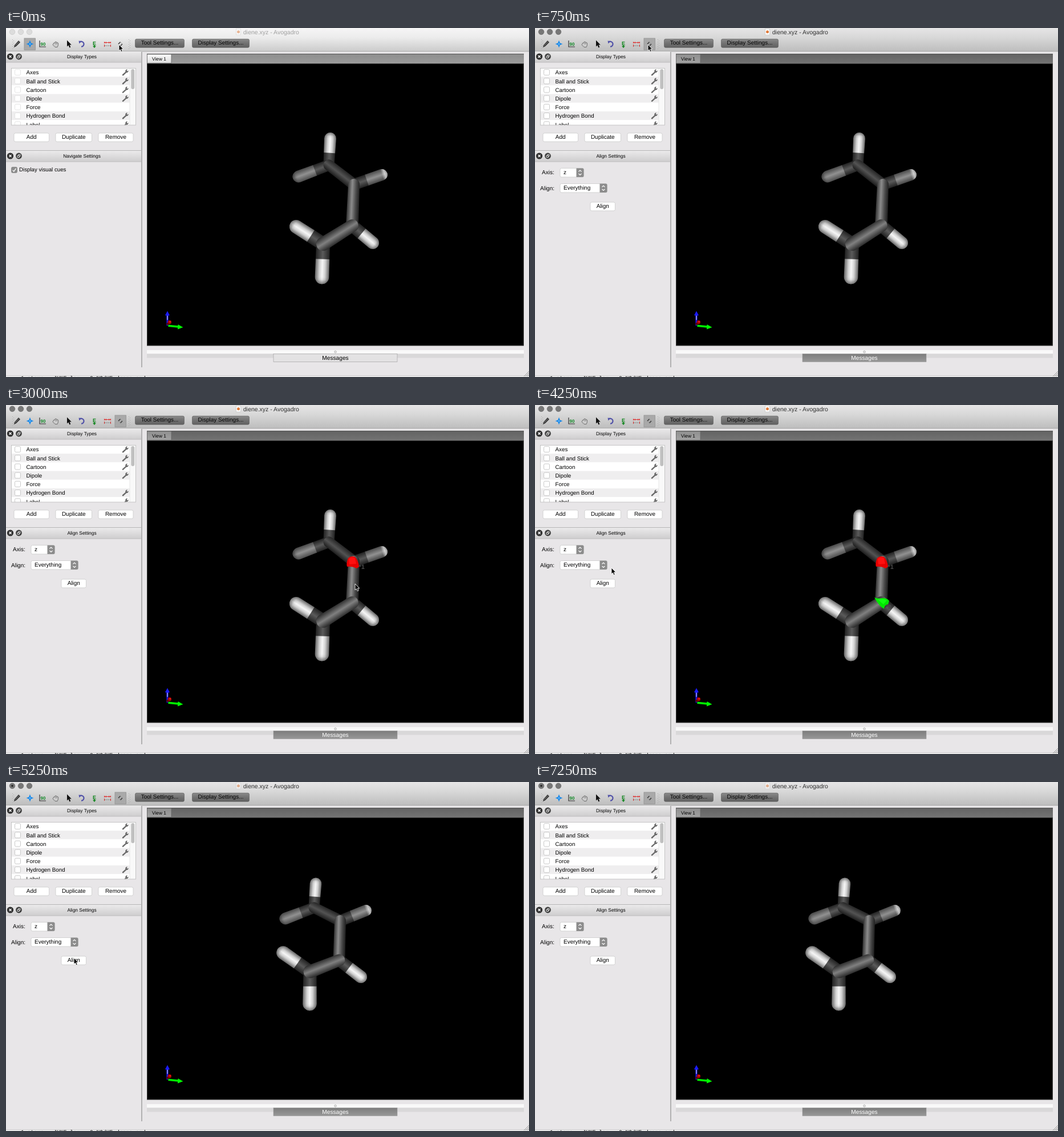
An HTML page for the animation above (7750 ms loop, 917 by 611 pixels).

```html
<!DOCTYPE html>
<html lang="en">
<head>
<meta charset="utf-8">
<title>Aligning a molecule</title>
<style>
html, body { margin: 0; width: 100%; height: 100%; overflow: hidden; background: #e8e6e8; }
svg { display: block; width: 917px; height: 611px; }
text { font-family: "Liberation Sans", Arial, sans-serif; font-size: 10px; text-rendering: geometricPrecision; }
.mid { text-anchor: middle; }
.small { font-size: 8.4px; }
</style>
</head>
<body>
<svg id="stage" viewBox="0 0 917 611"></svg>
<script>
const TICK = 250, LOOP = 7750;

// ---------- helpers ----------
const rect = (x, y, w, h, fill, more = '') =>
  `<rect x="${x}" y="${y}" width="${w}" height="${h}" fill="${fill}" ${more}/>`;
const text = (x, y, s, more = '') => `<text x="${x}" y="${y}" ${more}>${s}</text>`;
const circle = (x, y, r, fill, more = '') =>
  `<circle cx="${x}" cy="${y}" r="${r}" fill="${fill}" ${more}/>`;
const path = (d, fill, more = '') => `<path d="${d}" fill="${fill}" ${more}/>`;
const line = (d, color, w = 1, more = '') =>
  path(d, 'none', `stroke="${color}" stroke-width="${w}" ${more}`);
const group = (id, body) => `<g id="${id}">${body}</g>`;
const at = (x, y, body) => `<g transform="translate(${x} ${y})">${body}</g>`;
const stops = list => list.map(([o, c, a = 1]) =>
  `<stop offset="${o}" stop-color="${c}" stop-opacity="${a}"/>`).join('');
const vertical = (id, ...list) =>
  `<linearGradient id="${id}" x2="0" y2="1">${stops(list)}</linearGradient>`;
const horizontal = (id, ...list) => `<linearGradient id="${id}">${stops(list)}</linearGradient>`;

const defs = `<defs>
  ${vertical('barOff', [0, '#f6f5f6'], [.4, '#ececec'], [1, '#cbcbcb'])}
  ${vertical('barOn', [0, '#e6e5e6'], [.4, '#d8d8d8'], [1, '#bdbdbd'])}
  ${vertical('dock', [0, '#ebeaeb'], [1, '#cfcecf'])}
  ${vertical('pill', [0, '#8a8a8a'], [.5, '#727272'], [1, '#606060'])}
  ${vertical('tabOff', [0, '#fafafa'], [1, '#dcdcdc'])}
  ${vertical('tabOn', [0, '#8f8f8f'], [1, '#a2a2a2'])}
  ${vertical('stripOff', [0, '#8d8d8d'], [1, '#9c9c9c'])}
  ${vertical('stripOn', [0, '#626262'], [1, '#747474'])}
  ${vertical('message', [0, '#7c7c7c'], [1, '#989898'])}
  ${vertical('carbonDark', [0, '#242424'], [.5, '#535353'], [1, '#1c1c1c'])}
  ${vertical('carbonSide', [0, '#1c1c1c'], [.3, '#4a4a4a'], [.62, '#8c8c8c'], [1, '#303030'])}
  ${vertical('carbonLit', [0, '#2a2a2a'], [.5, '#808080'], [1, '#2c2c2c'])}
  ${vertical('stub', [0, '#222'], [.5, '#5a5a5a'], [1, '#222'])}
  ${vertical('bright', [0, '#666'], [.3, '#d2d2d2'], [.5, '#f6f6f6'], [.7, '#d2d2d2'], [1, '#666'])}
  ${vertical('dim', [0, '#4c4c4c'], [.5, '#919191'], [1, '#464646'])}
  ${horizontal('shadeTip', [0, '#000', 0], [.35, '#000', .06], [1, '#000', .5])}
  ${horizontal('litTip', [0, '#fff', 0], [.55, '#fff', .6], [1, '#ccc', .3])}
  <clipPath id="listClip">${rect(9, 70, 219, 100, '#fff')}</clipPath>
  <path id="wrench" d="M-5 4.2L.6 -.8Q-.2 -4.4 3 -5.2L3.6 -4.8 2.4 -3 3.8 -1.6 5.6 -2.8Q5.4 .6 2 .5L-3.4 5.6Q-5.4 6-5 4.2Z" fill="#666" stroke="#444" stroke-width=".3"/>
</defs>`;

// ---------- window chrome ----------
function toolbar() {
  const dots = x => Array.from({ length: 9 }, (_, i) => rect(x + i % 2 * 2, 20 + i * 2, 1, 1, '#aaa')).join('');
  const pressed = (id, x) => group(id, rect(x, 18, 19.5, 20.5, '#a9a9a9', 'stroke="#929292" stroke-width=".8"'));
  const pill = (x, w, s) => rect(x + .5, 19.3, w - 1, 15, 'url(#pill)', 'rx="2.5" stroke="#595959" stroke-width=".6"') +
    text(x + w / 2, 29.3, s, 'class="mid"');
  return pressed('navPressed', 32) + pressed('alignPressed', 191) +
    dots(11) + dots(215) +
    at(19, 28, path('M-5 6L-4 2 3-6 6-3-1 4Z', '#333') + line('M-3 3L4-4', '#888', 1)) +
    at(42, 28, path('M0-6.5L1.8-1.8 6.5 0 1.8 1.8 0 6.5-1.8 1.8-6.5 0-1.8-1.8Z', '#1687e8') + circle(0, 0, 1.2, '#7cc4ff')) +
    at(64, 28, line('M-5-6V5H6', '#333', 1.2) + text(-3.5, 3, '90', 'fill="#168a2b" style="font-size:8px;font-weight:bold"')) +
    at(87, 28.5, path('M-4-1Q-4-3-2-2L-1-4Q0-5 1-4L3-3Q5-3 4.6 0L4 3 3 5H-1L-5 1Z', '#ccc', 'stroke="#555" stroke-width=".8"') + line('M0-3V0M2-3V0', '#666', .7)) +
    at(107, 21.5, path('M0 0V11L2.5 8.8 4.4 13 6.3 12 4.5 8H7.8Z', '#111')) +
    at(133, 28, line('M-3.5-3.5A4.5 4.5 0 1 1-1 4.7', '#5051a8', 2.2) + path('M-5.5-5.5L-1-5-4.5-.5Z', '#5051a8')) +
    at(155, 28, text(0, 1.5, 'E', 'class="mid" fill="#11861e" style="font-size:9px;font-weight:bold"') +
      line('M0 2V5', '#11861e', 1.5) + path('M-3 3.5H3L0 7Z', '#11861e')) +
    at(178, 28, line('M-5.5-4V-1M5.5-4V-1M-5-2.5H5M-5.5 1V5M5.5 1V5', '#d33', 1) +
      line('M-5 3H5', '#777', 1.2, 'stroke-dasharray="2 1"') + path('M-5-2.5L-2-4V-1ZM5-2.5L2-4V-1Z', '#d33')) +
    at(200.5, 28, line('M-3.5 0L0-3.5M0 3.5L3.5 0', '#333', 1.4) + line('M-3.5 0L0 3.5M0-3.5L3.5 0', '#888', .6)) +
    pill(226, 87, 'Tool Settings...') + pill(326, 101, 'Display Settings...');
}

function dockTitle(y, id, label) {
  const cy = y + 9;
  return rect(0, y, 237, 18.5, 'url(#dock)') + line(`M0 ${y - .5}H237M0 ${y + 19}H237`, '#aaa', .8) +
    circle(7.5, cy, 5.6, '#303030') + line(`M5.5 ${cy - 2}l4 4m0-4l-4 4`, '#fff', 1.4) +
    circle(22.5, cy, 5.4, '#404040') +
    line(`M20 ${cy - .5}h3.5v3h-3.5zM21.5 ${cy - .5}v-2h3.5v3h-1.5`, '#fff', .8) +
    text(133, cy + 3, label, `class="mid small" id="${id}"`);
}

const button = (x, y, w, s) =>
  rect(x, y, w, 15, '#fff', 'rx="2.5" stroke="#c4c4c4" stroke-width=".7"') +
  text(x + w / 2, y + 10, s, 'class="mid"');

const combo = (y, w, s) =>
  rect(44, y, w, 15.5, '#fff', 'rx="2.5" stroke="#c4c4c4" stroke-width=".7"') +
  path(`M${31 + w} ${y}h10.5q2.5 0 2.5 2.5v10.5q0 2.5-2.5 2.5h-10.5z`, '#8c8c8c') +
  line(`M${35 + w} ${y + 6}l2.5-2.5 2.5 2.5m-5 3.5l2.5 2.5 2.5-2.5`, '#fff', 1.1) +
  text(50, y + 10.5, s);

function displayList() {
  const names = ['Axes', 'Ball and Stick', 'Cartoon', 'Dipole', 'Force', 'Hydrogen Bond', 'Label'];
  const rows = names.map((name, i) => {
    const y = 70 + i * 15.2;
    return rect(9, y, 208, 15.2, i % 2 ? '#efeeef' : '#fff') +
      rect(15.5, y + 2.6, 10, 10, '#fff', 'class="box" rx="2" stroke-width=".8"') +
      text(35.5, y + 11.4, name, 'style="font-size:9.8px"') +
      (name === 'Force' ? '' : `<use href="#wrench" x="209" y="${y + 7.6}"/>`);
  }).join('');
  return `<g clip-path="url(#listClip)">${rect(9, 70, 219, 100, '#fff')}${rows}
    ${rect(217, 70, 11, 100, '#f9f9f9')}${line('M217 70V170', '#e2e2e2', .8)}
    ${rect(219.3, 72, 6, 35, '#c0c0c0', 'rx="3"')}</g>` +
    rect(9.5, 70.5, 218, 99.5, 'none', 'stroke="#b9b9b9" stroke-width=".8"') +
    button(14, 184, 61.5, 'Add') + button(87, 184, 63.5, 'Duplicate') + button(162, 184, 61, 'Remove');
}

const sidebar = () =>
  line('M238 42V594', '#858585', 1.1) +
  dockTitle(41, 'typesTitle', 'Display Types') + displayList() +
  dockTitle(215, 'toolTitle', '') +
  group('navPanel',
    rect(9.5, 243.5, 10, 10, '#8c8c8c', 'rx="2" stroke="#777" stroke-width=".6"') +
    line('M11.8 248.8l2 2.4 3.6-5.4', '#fff', 1.3) +
    text(23, 251, 'Display visual cues', 'style="font-size:9.7px"')) +
  group('alignPanel',
    text(12, 256, 'Axis:') + combo(245.5, 41.5, 'z') +
    text(9, 283.5, 'Align:') + combo(272.5, 82.5, 'Everything') + button(97, 305, 43.5, 'Align'));

const viewFrame = () =>
  rect(247, 45, 661, 17.5, '', 'id="strip"') + line('M247 45.5H908', '#555') +
  rect(247.5, 46, 42.5, 15.5, '', 'id="viewTab" stroke="#666" stroke-width=".8"') +
  text(268.5, 56.5, 'View 1', 'class="mid small"') +
  rect(247.5, 62.5, 660, 493.5, '#000', 'stroke="#3c3c3c"') +
  rect(247, 564, 661, 6, '#f9f9f9') + circle(577.5, 567, 1.8, '#eee', 'stroke="#999" stroke-width=".7"') +
  rect(247, 570.5, 661, 7, '#d9d8d9') +
  rect(469, 570.5, 217, 14, '', 'id="messageTab" stroke="#999" stroke-width=".6"') +
  text(577.5, 580.8, 'Messages', 'class="mid" id="messageText" style="font-size:10.2px"') +
  rect(0, 609, 917, 2, '#f1f1f1') + line('M0 609H917', '#b9b9b9', .7) +
  text(26, 616, '1 atoms - JUNE log - 0 NO/HE drops and', 'style="font:9.6px \'Liberation Mono\',monospace"') +
  line('M908 610L917 601M911 610L917 604M914 610L917 607', '#888', .8);

// ---------- molecule ----------
// Atoms are [x, y, radius]: four carbons, then six hydrogens.
const before = [
  [566, 240, 9.5], [610, 274, 10], [607, 346, 11], [556, 378, 12],
  [568.5, 193.5, 10.5], [513, 260, 10.5], [659, 257, 10], [643, 376, 11], [509, 348, 12], [554, 436, 12.3]];
const after = [
  [540, 220, 9.5], [586, 243, 10], [584, 312, 10.5], [533, 332, 11.5],
  [543, 178, 10.3], [490, 239, 10.5], [631, 225, 10], [622, 341, 11], [486, 299, 11.8], [532.5, 388, 12.3]];

// A tube with a round start; `tip` names the shading laid over its round end.
function rod([ax, ay, ra], [bx, by, rb], fill, { flat = false, tip } = {}) {
  const len = Math.hypot(bx - ax, by - ay), angle = Math.atan2(by - ay, bx - ax) * 180 / Math.PI;
  const end = `A${rb} ${rb} 0 0 1 ${len} ${rb}`;
  const begin = flat ? 'Z' : `A${ra} ${ra} 0 0 1 0 ${-ra}Z`;
  return `<g transform="translate(${ax} ${ay}) rotate(${angle})">` +
    path(`M0 ${-ra}L${len} ${-rb}${end}L0 ${ra}${begin}`, `url(#${fill})`) +
    (tip ? path(`M${len} ${-rb}${end}Z`, `url(#${tip})`) : '') + '</g>';
}

function molecule(atoms) {
  const bond = (a, b, fill) => rod(atoms[a], atoms[b], fill);
  const hydrogen = (c, h, fill, tip = 'shadeTip') => {
    const middle = atoms[c].map((v, i) => v + (atoms[h][i] - v) * .46);
    return rod(atoms[c], middle, 'stub') + rod(middle, atoms[h], fill, { flat: true, tip });
  };
  return hydrogen(0, 4, 'bright') + hydrogen(0, 5, 'dim') +
    hydrogen(1, 6, 'dim', 'litTip') + bond(0, 1, 'carbonDark') +
    hydrogen(2, 7, 'bright') + bond(1, 2, 'carbonSide') +
    hydrogen(3, 8, 'bright') + hydrogen(3, 9, 'bright') + bond(2, 3, 'carbonLit');
}

const picks =
  group('firstPick', path('M600 268Q605 263 612 266Q618 272 619 283L615 286Q606 282 598 283Q596 277 600 268Z', '#e80000') +
    path('M601 269Q607 264 612 268L614 278 602 279Z', '#ff1010') +
    text(618.5, 287, '*1', 'fill="#4a4a4a" style="font-size:11px;font-weight:bold"')) +
  group('secondPick', path('M595 337Q602 340 609 338Q618 338 621 343L619 349Q613 349 612 357Q603 352 595 337Z', '#00e800') +
    path('M600 340Q610 338 617 342L611 349Z', '#10ff10') +
    text(615, 357, '*2', 'fill="#4a4a4a" style="font-size:10px;font-weight:bold"'));

const axes =
  line('M283 521V503', '#1414e0', 3.2) + line('M283 511V503', '#b4b4ff', 1.4) +
  path('M279 503L283 495.5 287 503Q283 504.5 279 503Z', '#1a1aff') +
  circle(286.8, 515, 3.3, '#a80000') + circle(287.6, 514.2, 1.3, '#e8201a') + circle(283.5, 518, 2, '#600') +
  line('M284.5 521.3L302 523', '#00f000', 3.4) +
  path('M301.5 519L310.5 524 301 527.5Z', '#00f800');

const titleBar =
  rect(0, 0, 917, 41, '', 'id="bar"') + line('M0 41H917', '#a3a3a3', .9) +
  [11, 26, 41].map(x => circle(x, 6.8, 4.8, '', 'class="light" stroke-width=".7"')).join('') +
  circle(11, 6.8, 1.8, '#222', 'id="dirty"') +
  group('docIcon', rect(403.5, 1.5, 8, 10.5, '#fff', 'stroke="#bbb" stroke-width=".6"') + circle(407.5, 6.8, 2.5, '#e07b3c')) +
  text(416, 10.5, 'diene.xyz - Avogadro', 'id="title" style="font-size:10.5px"');

const pointer = group('pointer',
  path('M0 0V11L2.5 8.7 4.2 12.7 6.2 11.8 4.5 7.9H7.8Z', '#000', 'stroke="#fff" stroke-width=".9"'));

document.getElementById('stage').innerHTML = defs + rect(0, 0, 917, 611, '#e8e6e8') +
  titleBar + toolbar() + sidebar() + viewFrame() +
  group('moleculeBefore', molecule(before)) + group('moleculeAfter', molecule(after)) + picks + axes + pointer;

// ---------- motion ----------
// Pointer stops: [tick, x, y]
const route = [[0, 198, 29], [4, 198, 29], [7, 578, 259], [8, 606, 273], [11, 606, 273], [12, 612, 313],
  [13, 607, 345], [15, 607, 345], [17, 134, 285], [18, 119, 308], [23, 119, 308], [25, 399, 8]];

function pointerAt(tick) {
  const next = route.findIndex(stop => stop[0] > tick);
  if (next < 0) return route[route.length - 1].slice(1);
  const [t0, x0, y0] = route[next - 1], [t1, x1, y1] = route[next];
  const k = (tick - t0) / (t1 - t0);
  return [x0 + (x1 - x0) * k, y0 + (y1 - y0) * k];
}

const el = id => document.getElementById(id);
const show = (id, on) => { el(id).style.display = on ? '' : 'none'; };
const fill = (id, color) => el(id).setAttribute('fill', color);

function draw(tick) {
  const active = tick >= 1, align = tick >= 3, aligned = tick >= 21;
  fill('bar', active ? 'url(#barOn)' : 'url(#barOff)');
  fill('strip', active ? 'url(#stripOn)' : 'url(#stripOff)');
  fill('viewTab', active ? 'url(#tabOn)' : 'url(#tabOff)');
  fill('messageTab', active ? 'url(#message)' : '#e3e2e3');
  fill('messageText', active ? '#fff' : '#000');
  fill('title', active ? '#303030' : '#a0a0a0');
  document.querySelectorAll('.light').forEach(c => {
    c.setAttribute('fill', active ? '#777' : '#dcdcdc');
    c.setAttribute('stroke', active ? '#666' : '#c8c8c8');
  });
  document.querySelectorAll('.box').forEach(b => b.setAttribute('stroke', active ? '#bcbcbc' : '#dedede'));
  el('docIcon').setAttribute('opacity', active && !aligned ? 1 : .5);
  el('toolTitle').textContent = align ? 'Align Settings' : 'Navigate Settings';
  show('dirty', aligned);
  show('navPressed', !align);
  show('alignPressed', align);
  show('navPanel', !align);
  show('alignPanel', align);
  show('moleculeBefore', !aligned);
  show('moleculeAfter', aligned);
  show('firstPick', tick >= 10 && !aligned);
  show('secondPick', tick >= 14 && !aligned);
  show('pointer', tick < 26);
  el('pointer').setAttribute('transform', `translate(${pointerAt(tick)})`);
}

const start = performance.now();
let shown = -1;
function frame() {
  const tick = Math.floor((performance.now() - start) % LOOP / TICK);
  if (tick !== shown) draw(shown = tick);
  requestAnimationFrame(frame);
}
frame();
</script>
</body>
</html>
```
